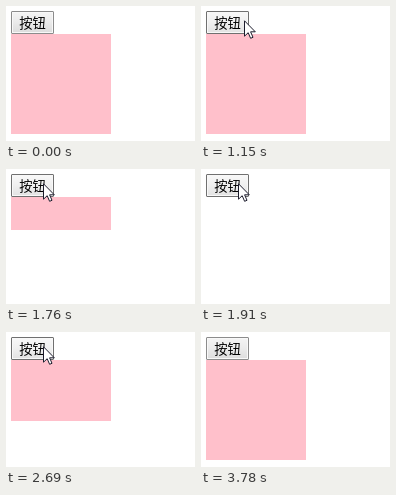
These frames come from a looping animation (189 by 135 pixels, 4100 ms). An HTML page:

```html
<!DOCTYPE html>
<html lang="zh">
<head>
<meta charset="utf-8">
<title>Slide toggle</title>
<style>
html, body { margin: 0; width: 100%; height: 100%; overflow: hidden; background: #fff; }
body > * { position: absolute; }
#button {
  left: 5px; top: 5px; width: 43px; height: 23px; box-sizing: border-box;
  border: 1px solid #8c8c8c; border-radius: 1px;
  box-shadow: inset 0 0 0 1px #f8f8f8;
  background: linear-gradient(#f4f4f4, #ebebeb 48%, #dcdcdc);
  font: 13.33px/21px "Noto Sans CJK SC", "Noto Sans CJK", sans-serif;
  color: #000; text-align: center; white-space: nowrap;
}
#button.hover { border-color: #707070; background: linear-gradient(#f8f8f8, #f0f0f0 48%, #e2e2e2); }
#button.down { border-color: #666; box-shadow: none; background: linear-gradient(#d4d4d4, #e6e6e6); }
#box { left: 5px; top: 28px; width: 100px; background: pink; }
#cursor { left: 0; top: 0; overflow: visible; }
</style>
</head>
<body>
<div id="button">按钮</div>
<div id="box"></div>
<svg id="cursor" width="12" height="19">
  <path d="M.5 .8V16.2L4.2 12.7L6.6 18.3L9 17.3L6.6 11.8H11.3Z" fill="#fff" stroke="#1c1c2c"/>
</svg>
<script>
const LOOP = 4100;
const $ = id => document.getElementById(id);
const button = $('button'), box = $('box'), cursor = $('cursor');

// The screen refreshes only at these moments.
const ticks = [0, 450, 520, 600, 670, 750, 820, 900, 990, 1070, 1140, 1220,
  1480, 1540, 1610, 1680, 1760, 1830, 1910, 2310, 2460, 2560, 2610, 2690, 2770, 2850,
  3150, 3230, 3310, 3380, 3460, 3530, 3610, 3700, 3780];

// Pointer tip: time, x, y
const path = [[450, 153, 126], [670, 134, 56], [750, 120, 40], [900, 85, 19],
  [990, 62, 15], [1070, 48, 14], [1220, 37, 14], [2850, 37, 14],
  [3150, 89, 12], [3310, 121, 39], [3460, 147, 79], [3610, 166, 119], [3700, 167, 126]];

const between = (t, from, to) => t >= from && t < to;

function swing(t, start, end) {
  const p = Math.min(1, Math.max(0, (t - start) / (end - start)));
  return 0.5 - Math.cos(p * Math.PI) / 2;
}

function pointer(t) {
  const i = Math.max(1, path.findIndex(p => p[0] >= t));
  const [a, b] = [path[i - 1], path[i]];
  const p = (t - a[0]) / (b[0] - a[0]);
  return [1, 2].map(k => Math.round(a[k] + (b[k] - a[k]) * p));
}

function draw(now) {
  const time = now % LOOP;
  const t = ticks.filter(k => k <= time).pop();
  const shown = between(t, 450, 3780);
  cursor.style.display = shown ? 'block' : 'none';
  if (shown) {
    const [x, y] = pointer(t);
    cursor.style.transform = `translate(${x}px, ${y}px)`;
  }
  const down = between(t, 1480, 1540) || between(t, 2310, 2460);
  button.className = down ? 'down' : between(t, 1070, 3150) ? 'hover' : '';
  const open = 1 - swing(t, 1525, 1910) + swing(t, 2480, 2850);
  box.style.height = Math.round(100 * open) + 'px';
}

const start = performance.now();
function frame() {
  draw(performance.now() - start);
  requestAnimationFrame(frame);
}
frame();
</script>
</body>
</html>
```
